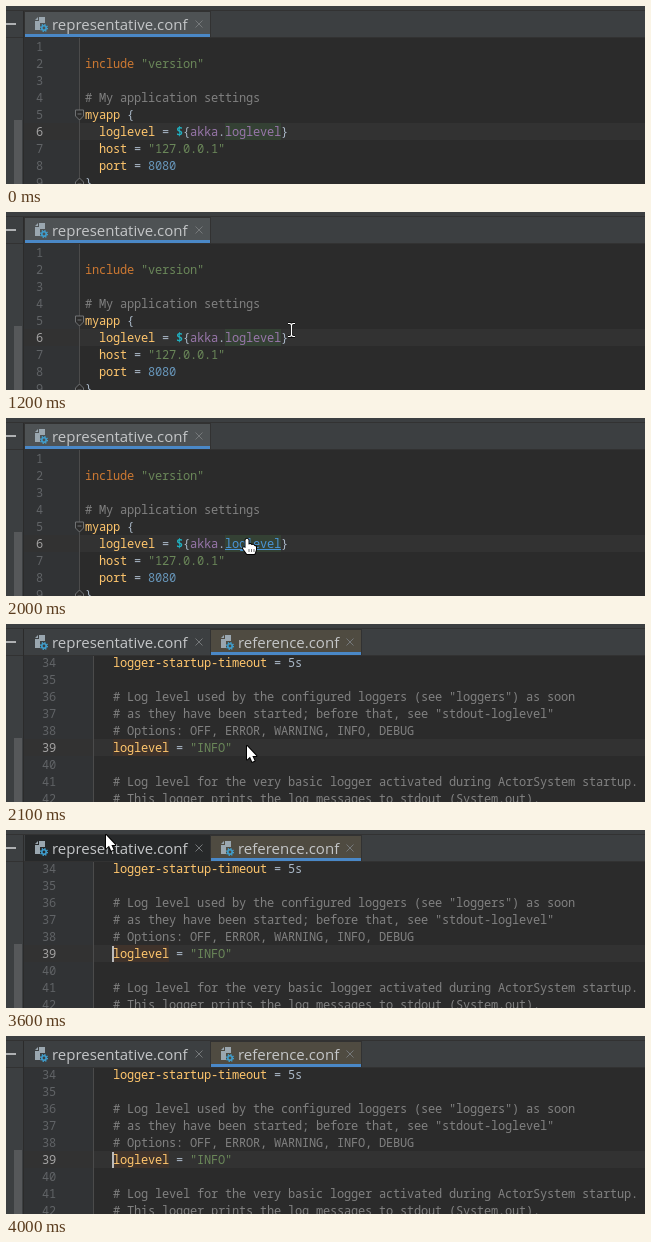
An HTML page with a canvas for the animation above (4200 ms loop, 639x178 px).

```html
<!DOCTYPE html>
<html lang="en">
<head>
<meta charset="utf-8">
<title>Go to definition</title>
<style>
  html, body { margin: 0; width: 100%; height: 100%; overflow: hidden; background: #2b2b2b; }
  canvas { display: block; }
</style>
</head>
<body>
<canvas id="stage" width="639" height="178"></canvas>
<script>
const ctx = document.getElementById('stage').getContext('2d');
const LOOP = 4200, LINE = 17, CHAR = 7;
const MONO = '12px "Noto Sans Mono", monospace';
const BOLD = 'bold ' + MONO;
const UI = '15px "Open Sans", sans-serif';

const COLORS = {
  w: '#cc7832', s: '#6a8759', c: '#808080', k: '#ffc66d', n: '#6897bb',
  t: '#a9b7c6', v: '#9876aa', d: '#20b0c0', l: '#4a94d6'
};

// Each part starts with its colour key.
const appLines = link => [
  [], ['winclude ', 's"version"'], [], ['c# My application settings'], ['kmyapp', 't {'],
  ['k  loglevel', 't = ', 'd$', 't{', 'vakka', 't.', (link ? 'l' : 'v') + 'loglevel', 't}'],
  ['k  host', 't = ', 's"127.0.0.1"'], ['k  port', 't = ', 'n8080'], ['t}']
];
const referenceLines = [
  ['klogger-startup-timeout', 't = 5s'], [],
  ['c# Log level used by the configured loggers (see "loggers") as soon'],
  ['c# as they have been started; before that, see "stdout-loglevel"'],
  ['c# Options: OFF, ERROR, WARNING, INFO, DEBUG'],
  ['kloglevel', 't = ', 's"INFO"'], [],
  ['c# Log level for the very basic logger activated during ActorSystem startup.'],
  ['c# This logger prints the log messages to stdout (System.out).']
];

// Pointer positions: start time, shape, x, y. Each holds until the next.
const POINTER = [
  [0], [700, 'beam', 414, 140], [800, 'beam', 384, 130], [900, 'beam', 350, 120],
  [1000, 'beam', 318, 112], [1100, 'beam', 295, 114], [1200, 'beam', 285, 118],
  [1300, 'hand', 268, 122], [1400, 'hand', 258, 121], [1600, 'hand', 241, 121],
  [2100, 'arrow', 241, 122], [3500, 'arrow', 168, 62], [3600, 'arrow', 100, 5],
  [3700, 'arrow', 80, 4], [3900, 'arrow', 67, 0], [4000]
];
const ARROW = new Path2D('M0 0V13.5L3 10.8L5.2 15.8L7.6 14.8L5.4 10H9.4Z');
const HAND = new Path2D('M-1.5 1Q0 -1.5 1.5 1V5.5L3.5 5L4.5 6L6.5 5.8L7.5 7L9 7.5V11L7.5 15H0L-4 9.5Q-4 7.5 -1.5 9Z');

function rect(x, y, w, h, color) {
  ctx.fillStyle = color;
  ctx.fillRect(x, y, w, h);
}

function label(text, x, y, color, font = MONO, align = 'left') {
  ctx.font = font;
  ctx.letterSpacing = font === UI ? '0px' : '-0.2px';
  ctx.textAlign = align;
  ctx.fillStyle = color;
  ctx.fillText(text, x, y);
}

function stroke(path, color, width = 1) {
  ctx.strokeStyle = color;
  ctx.lineWidth = width;
  ctx.stroke(new Path2D(path));
}

function at(x, y, draw) {
  ctx.save();
  ctx.translate(x, y);
  draw();
  ctx.restore();
}

function editor(lines, first, current, gutter, numberX, textX, baseline) {
  const rowTop = baseline + (current - first) * LINE - 13;
  rect(18, 32, gutter - 18, 146, '#313335');
  rect(gutter, 32, 639 - gutter, 146, '#2b2b2b');
  rect(18, rowTop, 621, LINE, '#323232');
  rect(gutter, 32, 1, 146, '#4b4b4b');
  return () => lines.forEach((parts, i) => {
    const y = baseline + i * LINE, number = first + i;
    label(number, numberX, y, number === current ? '#a4a3a3' : '#606366', MONO, 'right');
    let x = textX;
    for (const part of parts) {
      const text = part.slice(1);
      label(text, x, y, COLORS[part[0]], part[0] === 'd' ? BOLD : MONO);
      x += text.length * CHAR;
    }
  });
}

function fold(y, flip) {
  at(73.5, y, () => {
    ctx.scale(1, flip);
    ctx.fillStyle = '#2b2b2b';
    ctx.fill(new Path2D('M-4 -5H4V1L0 5L-4 1Z'));
    stroke('M-4 -5H4V1L0 5L-4 1ZM-2 -1H2', '#707274');
  });
}

function appFile(link) {
  const drawText = editor(appLines(link), 1, 6, 73, 37, 79, 45);
  rect(219, 117, 56, LINE, '#344134');
  fold(109, 1);
  fold(177, -1);
  drawText();
  if (link) rect(219, 131, 56, 1, COLORS.l);
}

function referenceFile(caret) {
  const drawText = editor(referenceLines, 34, 39, 87, 50, 107, 43);
  rect(107, 115, 56, LINE, '#40332b');
  drawText();
  if (caret) rect(106, 116, 2, 16, '#bbbbbb');
}

function ring(radius, width, color) {
  ctx.beginPath();
  ctx.arc(10, 11, radius, 0, 7);
  ctx.strokeStyle = color;
  ctx.lineWidth = width;
  ctx.stroke();
}

function tab(x, width, name, color, active) {
  if (active) rect(x, 5, width, 26, '#323232');
  rect(x + 1, active ? 6 : 5, width - 2, active ? 25 : 26, color);
  if (active) rect(x + 1, 28, width - 2, 3, '#4a88c7');
  at(x + 10, 11, () => {
    ctx.fillStyle = '#9aa7b0';
    ctx.fill(new Path2D('M5 0H11V6H6V13H1V4H5ZM4 0V3H1Z'));
    ring(2.2, 1.6, '#40a0d0');
    ctx.setLineDash([1.3, 1.32]);
    ring(3.35, 1.4, '#40a0d0');
  });
  label(name, x + 28, 24, '#c4c6c8', UI);
  const c = x + width - 12;
  stroke(`M${c - 3.5} 14.5l7 7m0 -7l-7 7`, '#75787a');
}

function chrome(reference, hover) {
  rect(0, 0, 639, 31, '#3c3f41');
  rect(0, 4, 639, 1, '#323232');
  rect(0, 31, 639, 1, '#323232');
  rect(0, 32, 17, 146, '#3c3f41');
  rect(17, 5, 1, 173, '#2b2b2b');
  rect(8, 114, 8, 64, '#56585a');
  rect(0, 17, 10, 2, '#afb1b3');
  tab(18, 187, 'representative.conf', hover ? '#27292a' : reference ? '#3c3f41' : '#4e5254', !reference);
  if (reference) tab(204, 152, 'reference.conf', '#4f4b41', true);
}

function pointer(shape, x, y) {
  if (!shape) return;
  at(x, y, () => {
    if (shape === 'beam') {
      const beam = 'M-3 -6.5H-1L.5 -5.5L2 -6.5H4M.5 -5.5V5.5M-3 6.5H-1L.5 5.5L2 6.5H4';
      stroke(beam, '#111', 3);
      stroke(beam, '#fff', 1.2);
    } else {
      const path = shape === 'hand' ? HAND : ARROW;
      ctx.strokeStyle = '#000';
      ctx.lineWidth = 2;
      ctx.lineJoin = 'round';
      ctx.stroke(path);
      ctx.fillStyle = '#fff';
      ctx.fill(path);
      if (shape === 'hand') stroke('M2 10V13M4.5 10V13M7 10V13', '#333', .7);
    }
  });
}

function frame(now) {
  const t = now % LOOP, reference = t >= 2100;
  if (reference) referenceFile(t >= 2200 && t < 3200 || t >= 3500);
  else appFile(t >= 1300);
  chrome(reference, t >= 3600 && t < 3700);
  const [, shape, x, y] = POINTER.findLast(p => p[0] <= t);
  pointer(shape, x, y);
  requestAnimationFrame(() => frame(performance.now() - start));
}

const start = performance.now();
frame(0);
</script>
</body>
</html>
```
